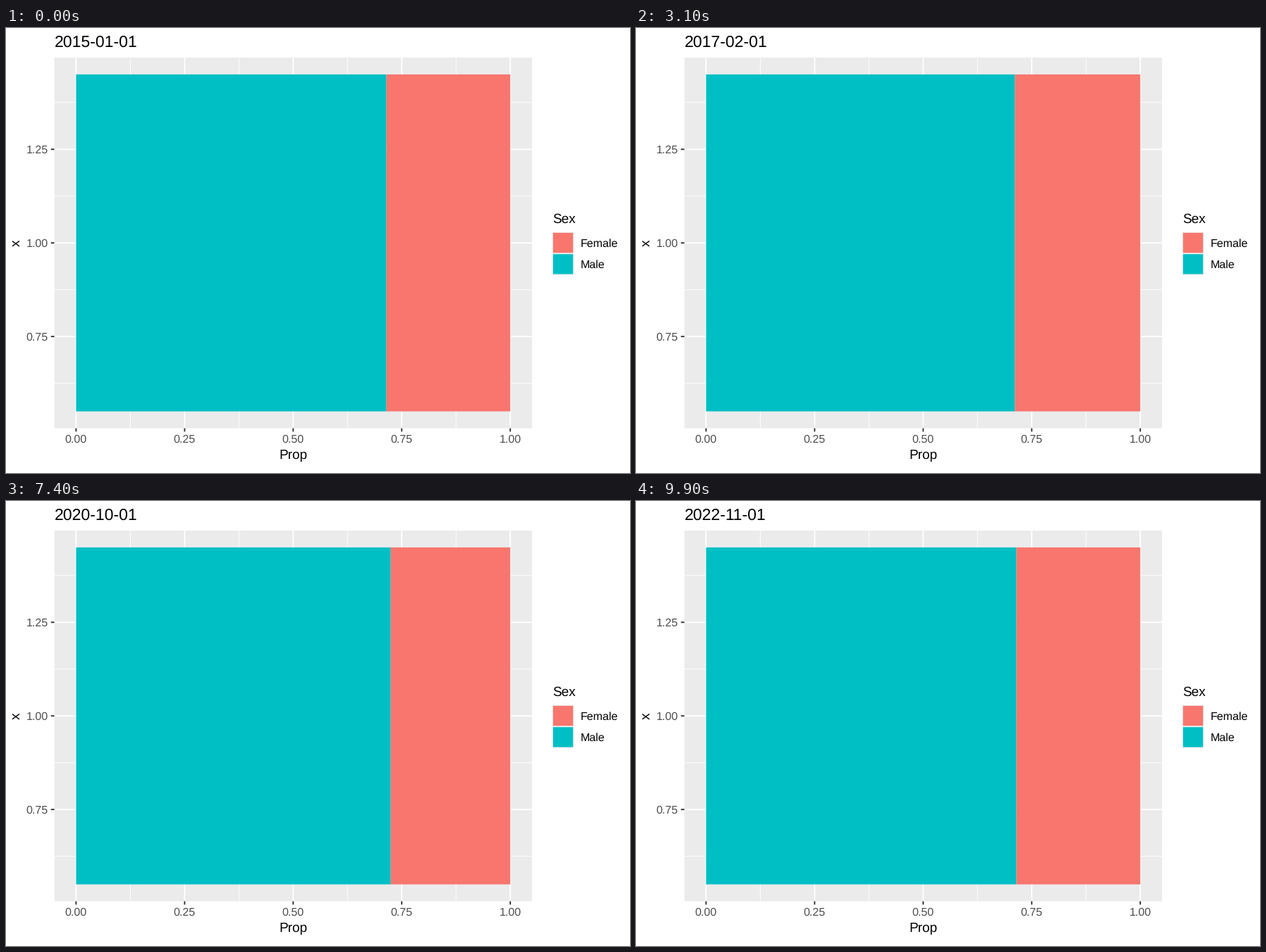
A matplotlib script that plays this animation: 885 px wide and 632 px high, repeating every 10 s.

```python
import matplotlib.pyplot as plt
import numpy as np
from matplotlib.animation import FuncAnimation
from matplotlib.patches import Rectangle

plt.rcParams["font.family"] = "Liberation Sans"
plt.rcParams["text.hinting"] = "none"
plt.rcParams["text.hinting_factor"] = 1

W, H, DPI = 885, 632, 100
PX = 72 / DPI
FRAMES, INTERVAL = 100, 100

MALE, FEMALE = "#00BFC4", "#F8766D"
PANEL, AXIS_TEXT, TICK = "#EBEBEB", "#4D4D4D", "#333333"
LEFT, RIGHT, TOP, BOTTOM = 68.6, 746.0, 42.0, 568.4
MAJOR, MINOR = 1.88, 0.94

fig = plt.figure(figsize=(W / DPI, H / DPI), dpi=DPI, facecolor="white")
ax = fig.add_axes([0, 0, 1, 1])
ax.set_xlim(0, W)
ax.set_ylim(H, 0)
ax.axis("off")


def x_px(v):
    return LEFT + (v + 0.05) / 1.1 * (RIGHT - LEFT)


def y_px(v):
    return BOTTOM - (v - 0.505) / 0.99 * (BOTTOM - TOP)


def rect(x0, y0, x1, y1, color):
    patch = Rectangle((x0, y0), x1 - x0, y1 - y0, fc=color, lw=0, snap=False)
    return ax.add_patch(patch)


def line(x0, y0, x1, y1, color, width):
    ax.plot([x0, x1], [y0, y1], color=color, lw=width * PX,
            solid_capstyle="butt", snap=False, zorder=1)


def text(x, y, s, size, color="black", ha="left", **kw):
    return ax.text(x, y, s, fontsize=size * PX, color=color, ha=ha,
                   va="baseline", **kw)


# Panel, grid and axes
rect(LEFT, TOP, RIGHT, BOTTOM, PANEL)
for v in np.arange(0.125, 1, 0.25):
    line(x_px(v), TOP, x_px(v), BOTTOM, "white", MINOR)
for v in np.arange(0.625, 1.4, 0.25):
    line(LEFT, y_px(v), RIGHT, y_px(v), "white", MINOR)
for v in np.arange(0, 1.01, 0.25):
    x = x_px(v)
    line(x, TOP, x, BOTTOM, "white", MAJOR)
    line(x, BOTTOM, x, BOTTOM + 4.85, TICK, MAJOR)
    text(x, 588.4, f"{v:.2f}", 15.5, AXIS_TEXT, "center")
for v in (0.75, 1.0, 1.25):
    y = y_px(v)
    line(LEFT, y, RIGHT, y, "white", MAJOR)
    line(LEFT - 4.85, y, LEFT, y, TICK, MAJOR)
    text(60, y + 5.6, f"{v:.2f}", 15.5, AXIS_TEXT, "right")
text(407.4, 611.6, "Prop", 19.4, ha="center")
text(20, 305.2, "x", 19.4, ha="center", rotation=90, rotation_mode="anchor")

# Legend
text(775, 276.8, "Sex", 19.4)
for i, (name, color) in enumerate((("Female", FEMALE), ("Male", MALE))):
    y = 289.9 + 30.3 * i
    rect(774.9, y, 805.2, y + 30.3, PANEL)
    rect(775.9, y + 1, 804.2, y + 29.3, color)
    text(814.8, y + 20.7, name, 15.5)

# Stacked bar
bar_top, bar_bottom = y_px(1.45), y_px(0.55)
male = rect(x_px(0), bar_top, x_px(0.7), bar_bottom, MALE)
female = rect(x_px(0.7), bar_top, x_px(1), bar_bottom, FEMALE)
male.set_zorder(3)
female.set_zorder(3)
title = text(68.6, 26.8, "", 23.3)

# Months since January 2015; one month has no data
MONTHS = [m for m in range(95) if m != 50]
KNOTS = [0, 6, 25, 41, 58, 78, 94]
LEVELS = [0.7147, 0.7114, 0.7114, 0.7176, 0.7243, 0.7249, 0.7146]
DECEMBERS = [0.731, 0.7325, 0.7358, 0.7277, 0.739, 0.747, 0.776]
share = np.interp(np.arange(95), KNOTS, LEVELS)
share[11::12] = DECEMBERS


def update(k):
    # The first six months last two frames each, the second one tweening
    state = k // 2 if k < 12 else k - 6
    m = MONTHS[state]
    p = share[m]
    if k < 12 and k % 2:
        p = (p + share[MONTHS[state + 1]]) / 2
    split = x_px(p)
    male.set_width(split - x_px(0))
    female.set_x(split)
    female.set_width(x_px(1) - split)
    title.set_text(f"{2015 + m // 12}-{m % 12 + 1:02d}-01")
    return male, female, title


anim = FuncAnimation(fig, update, frames=FRAMES, interval=INTERVAL,
                     repeat=True, repeat_delay=0)
plt.show()
```
